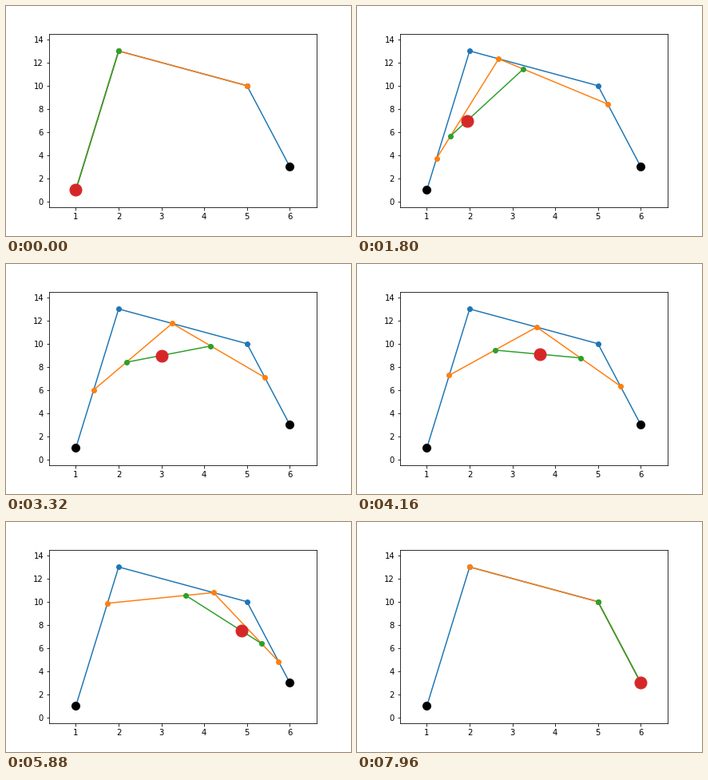
Animation of 432x288 px, one loop 8 s. Source, as a matplotlib script:

```python
import numpy as np
import matplotlib.pyplot as plt
from matplotlib.animation import FuncAnimation

FRAMES = 200
INTERVAL = 40
MARGIN = 0.125

control = np.array([[1, 1], [2, 13], [5, 10], [6, 3]], dtype=float)


def subdivide(points, t):
    """One de Casteljau step: blend each pair of neighbouring points."""
    return (1 - t) * points[:-1] + t * points[1:]


def padded(values):
    pad = MARGIN * np.ptp(values)
    return values.min() - pad, values.max() + pad


plt.rcParams["font.family"] = "DejaVu Sans"
plt.rcParams["font.size"] = 10

fig, ax = plt.subplots(figsize=(6, 4), dpi=72)
fig.subplots_adjust(left=0.125, right=0.9, bottom=0.125, top=0.88)
ax.set_xlim(*padded(control[:, 0]))
ax.set_ylim(*padded(control[:, 1]))
ax.set_xticks(range(1, 7))
ax.set_yticks(range(0, 15, 2))

ax.plot(*control.T, "o-", color="C0")
ax.plot(*control[[0, -1]].T, "o", color="black", markersize=10)
levels = [
    ax.plot([], [], "o-", color="C1")[0],
    ax.plot([], [], "o-", color="C2")[0],
    ax.plot([], [], "o", color="C3", markersize=15)[0],
]


def update(i):
    t = i / (FRAMES - 1)
    points = control
    for line in levels:
        points = subdivide(points, t)
        line.set_data(*points.T)
    return levels


anim = FuncAnimation(fig, update, frames=FRAMES, interval=INTERVAL,
                     repeat=True, repeat_delay=0)
plt.show()
```
